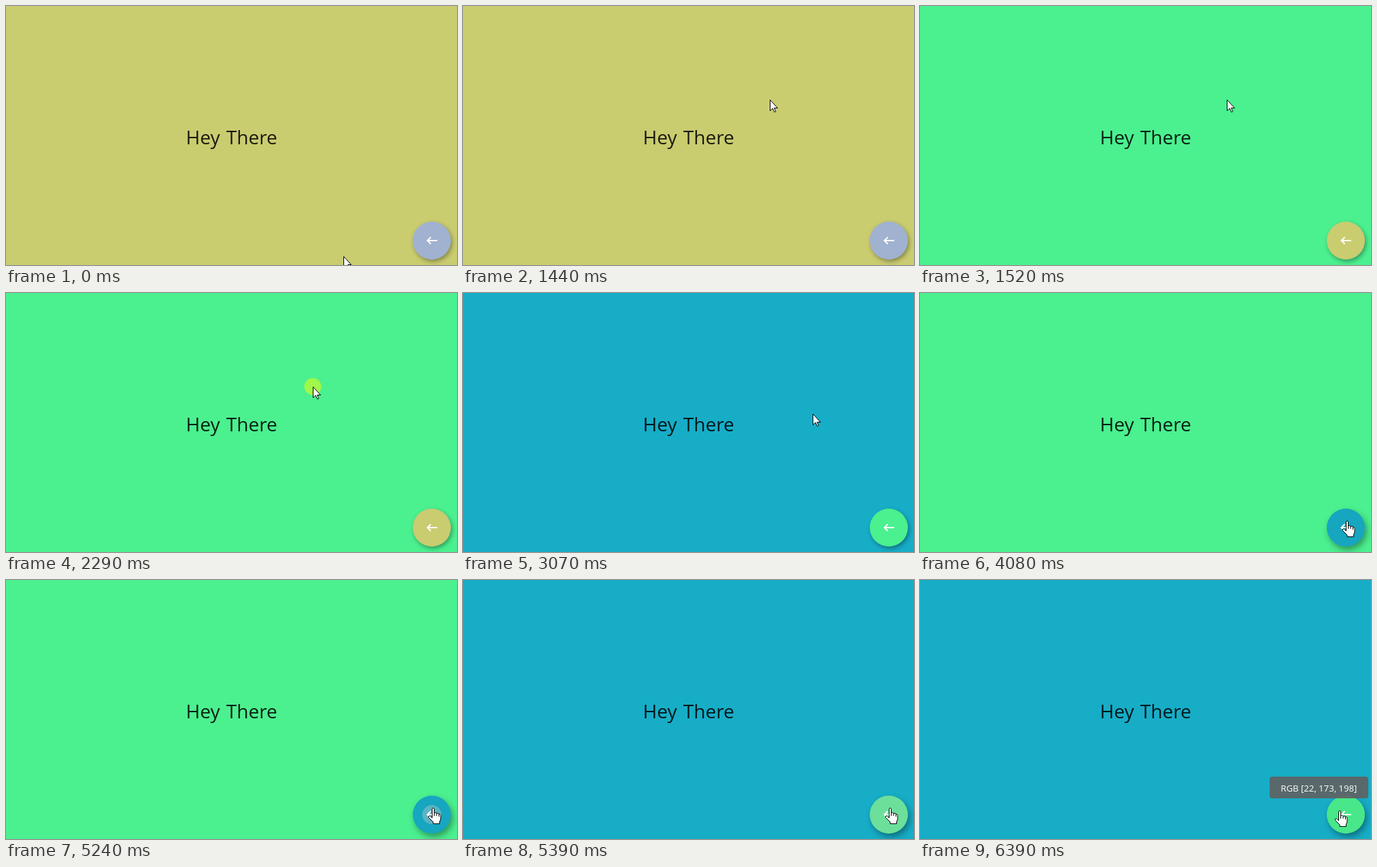
Animation of 663x382 px, one loop 8 s. Source, as an HTML page:

```html
<!DOCTYPE html>
<html>
<head>
<meta charset="utf-8">
<style>
  html, body { margin: 0; width: 100%; height: 100%; overflow: hidden; }
  svg { display: block; width: 663px; height: 382px; }
  text { font-family: "Open Sans", "Noto Sans", sans-serif; text-anchor: middle; }
  .cursor { fill: #fff; stroke: #000; stroke-width: 1; }
</style>
</head>
<body>
<svg viewBox="0 0 663 382">
  <rect id="page" width="663" height="382"/>
  <circle id="tap" cx="451" cy="138" r="12.5" fill="#ff0" fill-opacity=".48"/>
  <text x="331.7" y="204" font-size="28" word-spacing="2" fill-opacity=".87">Hey There</text>
  <circle id="button" cx="626" cy="346" r="28"/>
  <circle id="hover" cx="626" cy="346" r="28" fill-opacity=".04"/>
  <circle id="ripple" cx="626" cy="346" fill="#c8c8c8"/>
  <path fill="none" stroke="#fff" stroke-width="2" d="M634 346H620M624.5 341L619.5 346L624.5 351"/>
  <g id="tooltip">
    <rect x="514" y="290" width="145" height="32" rx="4" fill="#616161" fill-opacity=".9"/>
    <text x="586.3" y="311.5" font-size="13.2" fill="#fff">RGB [22, 173, 198]</text>
  </g>
  <path id="arrow" class="cursor" d="M.5.5V16.5L4.2 13L6.8 18.5L8.8 17.6L6.5 12.5H11.5Z"/>
  <path id="hand" class="cursor" d="M-1.5 1.5Q-1.5 .5 0 .5T1.5 1.5V8Q2 7 3.5 7T5 9Q5.5 8 7 8T8.5 10Q9 9 10 9.5T11 11.5V16Q11 18 9.5 20V23.5H0V21L-6.5 14.5Q-7.5 12.5 -6 12T-3.5 13L-1.5 15ZM1.5 8V12M5 9V12M8.5 10V13"/>
</svg>
<script>
const LOOP = 8000;
const olive = '#cacc70', green = '#4bf08f', teal = '#17adc7', blue = '#a0b2d0';
// start time, page colour, button colour
const themes = [
  [0, olive, blue], [1520, green, olive], [2460, teal, green],
  [3850, green, teal], [5320, teal, green]
];
const el = id => document.getElementById(id);
const show = (id, on) => el(id).setAttribute('visibility', on ? 'visible' : 'hidden');
const within = (t, a, b) => t >= a && t < b;
const mix = (a, b, p) => a + (b - a) * p;
const easeOut = (p, power) => 1 - (1 - p) ** power;

// Progress 0..1 in n even steps, the first landing at a and the last at b.
function stepped(t, a, b, n) {
  if (t < a) return 0;
  return Math.min(1, (Math.floor((t - a) / (b - a) * (n - 1) + 0.1) + 1) / n);
}

function pointer(t) {
  if (t < 740) {
    const p = stepped(t, 70, 420, 6), q = 1 - p;
    return [q * q * 496 + 2 * p * q * 425 + p * p * 461, mix(369, 118, easeOut(p, 1.6))];
  }
  if (t < 3070) {
    const p = stepped(t, 740, 900, 3);
    return [mix(461, 451, p), mix(118, 138, p)];
  }
  if (t < 5620) {
    const p = stepped(t, 3070, 3620, 8);
    return [mix(451, 628, easeOut(p, 3.3)), mix(138, 336, easeOut(p, 1.7))];
  }
  const p = stepped(t, 5620, 6240, 9);
  return [mix(628, 617, p), mix(336, 340, p)];
}

function drawRipple(t) {
  const start = t < 5000 ? 3770 : 5240;
  const step = Math.round(stepped(t, start, start + 310, 5) * 5);
  const alpha = [0, .4, .4, .28, .14, 0][step];
  el('ripple').setAttribute('r', step < 2 ? 14 : 28);
  el('ripple').setAttribute('fill-opacity', alpha);
}

function draw(now) {
  const t = now % LOOP;
  const [, page, button] = themes.filter(theme => theme[0] <= t).pop();
  const [x, y] = pointer(t);
  const over = Math.hypot(x - 626, y - 346) < 28;

  el('page').setAttribute('fill', page);
  el('button').setAttribute('fill', button);
  el('button').style.filter = over
    ? 'drop-shadow(3px 5px 5px rgba(0,0,0,.36))'
    : 'drop-shadow(2px 3px 3px rgba(0,0,0,.34))';
  show('hover', over);
  show('tap', within(t, 1350, 1440) || within(t, 2290, 2460));
  drawRipple(t);
  el('tooltip').setAttribute('opacity', stepped(t, 6080, 6310, 4));

  show('arrow', !over);
  show('hand', over);
  for (const id of ['arrow', 'hand'])
    el(id).setAttribute('transform', `translate(${Math.round(x)} ${Math.round(y)})`);
  requestAnimationFrame(() => draw(performance.now()));
}
draw(performance.now());
</script>
</body>
</html>
```
